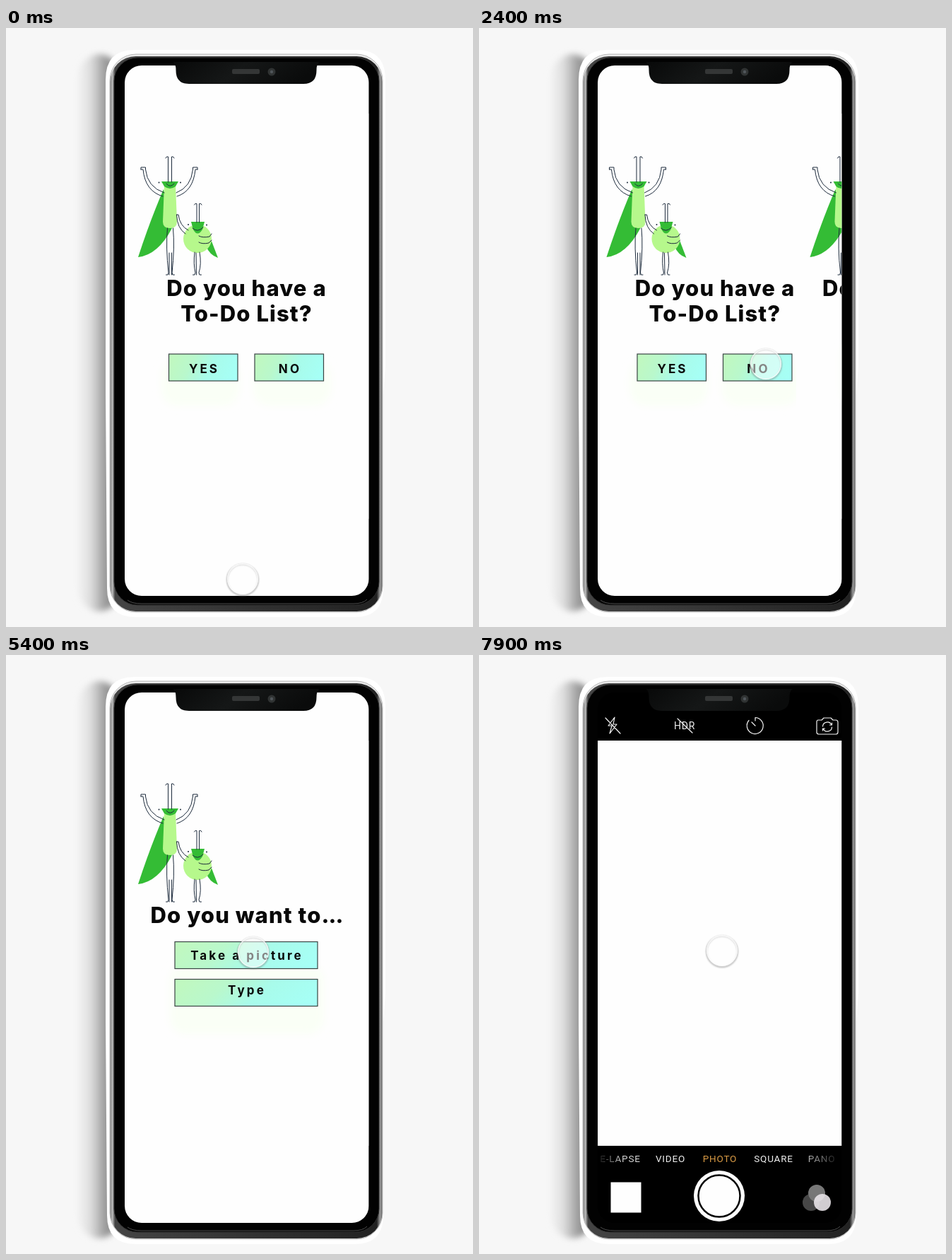
Animation of 661 by 847 pixels, one loop 8000 ms. Source, as an HTML page:

```html
<!DOCTYPE html>
<html lang="en">
<head>
<meta charset="utf-8">
<title>To-do app prototype</title>
<style>
  html, body { margin: 0; width: 100%; height: 100%; overflow: hidden; background: #f7f7f7; }
  svg { display: block; width: 100vw; height: 100vh; }
  text { font-family: Inter, "Open Sans", sans-serif; font-weight: 700; text-anchor: middle; fill: #080808; }
  .title { font-size: 31px; font-weight: 800; letter-spacing: 1.1px; }
  .dots { letter-spacing: -.9px; }
  .label { font-size: 17px; letter-spacing: 3.1px; }
  .mode { font: 400 13.5px Roboto, sans-serif; letter-spacing: .8px; fill: #eee; }
  .line { fill: none; stroke: #1d2b3c; stroke-width: 1; stroke-linecap: round; stroke-linejoin: round; }
  .icon { fill: none; stroke: #f4f4f4; stroke-width: 1.2; stroke-linecap: round; stroke-linejoin: round; }
  .button { fill: url(#mint); stroke: #3a4444; stroke-width: 1.2; }
  .glow { fill: #fafff6; filter: url(#soft); }
  .leaf { fill: #34bc35; }
  .lime { fill: #b6f88c; }
</style>
</head>
<body>
<svg viewBox="0 0 661 847">
  <defs>
    <linearGradient id="mint" x1="0" y1=".4" x2="1" y2=".6">
      <stop offset="0" stop-color="#c0f8c0"/>
      <stop offset=".3" stop-color="#b9f8cc"/>
      <stop offset=".6" stop-color="#a8fbea"/>
      <stop offset="1" stop-color="#a6fff6"/>
    </linearGradient>
    <linearGradient id="shade">
      <stop offset="0" stop-color="#f4f4f4"/>
      <stop offset=".3" stop-color="#dedede"/>
      <stop offset=".66" stop-color="#989898"/>
      <stop offset="1" stop-color="#808080"/>
    </linearGradient>
    <linearGradient id="metal">
      <stop offset="0" stop-color="#777"/>
      <stop offset=".008" stop-color="#bbb"/>
      <stop offset=".018" stop-color="#444"/>
      <stop offset=".98" stop-color="#222"/>
      <stop offset=".992" stop-color="#999"/>
      <stop offset="1" stop-color="#666"/>
    </linearGradient>
    <linearGradient id="notch" x1="0" y1="0" x2="1" y2=".2">
      <stop offset="0" stop-color="#080909"/>
      <stop offset=".5" stop-color="#151717"/>
      <stop offset="1" stop-color="#0a0b0b"/>
    </linearGradient>
    <linearGradient id="fadeIn" gradientUnits="userSpaceOnUse" x1="166" x2="206" y1="0" y2="0">
      <stop offset="0" stop-color="#000"/><stop offset="1" stop-color="#d8d8d8"/>
    </linearGradient>
    <linearGradient id="fadeOut" gradientUnits="userSpaceOnUse" x1="464" x2="504" y1="0" y2="0">
      <stop offset="0" stop-color="#bbb"/><stop offset="1" stop-color="#222"/>
    </linearGradient>
    <filter id="soft" x="-30%" y="-60%" width="160%" height="220%"><feGaussianBlur stdDeviation="6"/></filter>
    <filter id="haze" x="-40%" y="-5%" width="180%" height="110%"><feGaussianBlur stdDeviation="4"/></filter>
    <filter id="edge"><feGaussianBlur stdDeviation=".8"/></filter>
    <clipPath id="screen"><rect x="168" y="53" width="345.500" height="750" rx="24"/></clipPath>

    <g id="insects">
      <path class="leaf" d="M223 228Q204 272 187 324Q215 321 235 283Z"/>
      <path class="lime" d="M224 222H240L242 274Q242 283 232 283Q222 283 222 274Z"/>
      <path class="leaf" d="M220 217H244L240 224Q232 230 224 224Z"/>
      <path class="line" d="M226 184Q227 181 229.500 182V218M238 184Q237 181 234.500 182V218
        M227 220Q232 227 238 220
        M191 200V197H197.500V200Q200 225 224 233M191 200H194Q197 231 222 238
        M271 200V197H264.500V200Q262 225 241 233M271 200H268Q265 231 242 238
        M228.500 283Q226 310 230 346L229 349H226.500M231 318V349
        M236.500 283Q239 310 235 346L236 349H238.500M234.500 318V349"/>
      <path class="leaf" d="M287 291L300 325Q288 321 283 308Z"/>
      <circle class="lime" cx="271" cy="298" r="20"/>
      <path class="leaf" d="M262 274H281L278 285Q271 296 265 285Z"/>
      <path class="line" d="M266.500 250Q268 247 270 248.500V275M277 250Q276 247 273.500 248.500V275
        M264 283Q271 290 279 282
        M241.500 264H244Q246 280 258 286M241.500 264Q242 283 254 291
        M273 294Q278 297 288 295L291 291M273 303Q278 306 287 304L291 300
        M267 317Q265 334 268 346L267 349H264.500M269 318L269.500 349
        M274 317Q277 334 273 346L274 349H276.500"/>
      <g fill="#1d2b3c">
        <circle cx="216.500" cy="218.500" r="1"/><circle cx="247" cy="218.500" r="1"/>
        <circle cx="258" cy="278" r="1"/><circle cx="284" cy="278.500" r="1"/>
      </g>
    </g>
  </defs>

  <rect width="661" height="847" fill="#f7f7f7"/>
  <rect x="101" y="37" width="62" height="788" rx="36" fill="url(#shade)" filter="url(#haze)"/>
  <path fill="#fff" d="M181 31H497Q537 31 537 73V478L534 520V792Q534 833 494 833H183Q143 833 143 792L141 520V73Q141 31 181 31Z"/>
  <rect x="147" y="37" width="386" height="789" rx="37" fill="#e9e9e9" stroke="#aaa" stroke-width=".8"/>
  <rect x="147.500" y="40" width="385" height="785" rx="36" fill="url(#metal)"/>
  <rect x="153" y="42" width="375" height="774" rx="33" fill="#020202" stroke="#2c2c2c"/>
  <path d="M172 809Q178 814 192 814H492Q505 814 511 808" fill="none" stroke="#4d4d4d"/>

  <g clip-path="url(#screen)">
    <g id="askPage">
      <rect x="167" y="53" width="347" height="750" fill="#fefefe"/>
      <rect class="glow" x="220" y="470" width="110" height="64" rx="22"/>
      <rect class="glow" x="350" y="470" width="110" height="64" rx="22"/>
      <use href="#insects"/>
      <text class="title" x="340.500" y="379">Do you have a</text>
      <text class="title" x="340.500" y="415">To-Do List?</text>
      <rect class="button" x="230.500" y="461" width="97.500" height="38"/>
      <rect class="button" x="352" y="461" width="97.500" height="38"/>
      <text class="label" x="280.500" y="488">YES</text>
      <text class="label" x="402" y="488">NO</text>
    </g>
    <g id="choicePage">
      <rect x="167.500" y="53" width="400" height="750" fill="#fefefe"/>
      <rect class="glow" x="232" y="438" width="218" height="98" rx="22"/>
      <use href="#insects"/>
      <text class="title" x="340.500" y="379">Do you want to<tspan class="dots">...</tspan></text>
      <rect class="button" x="239" y="405.500" width="202" height="38"/>
      <rect class="button" x="239" y="458.500" width="202" height="38"/>
      <text class="label" x="341" y="431">Take a picture</text>
      <text class="label" x="341" y="480">Type</text>
    </g>
    <g id="cameraPage">
      <rect x="167.500" y="53" width="347" height="750" fill="#000"/>
      <rect x="167.500" y="121" width="346" height="573" fill="#fefefe"/>
      <path class="icon" d="M179 89L200 111M192 88L183 100H188L185 111L195 98H190Z"/>
      <text class="mode" x="291" y="105" style="font-size:14px">HDR</text>
      <path class="icon" d="M281 90L302 110M391 88.500V93M391 88.500A11.500 11.500 0 1 1 382 92.500M386 95L391 100"/>
      <path class="icon" d="M480 92H485L488 89H498L501 92H505Q508 92 508 95V109Q508 112 505 112H481Q478 112 478 109V95Q478 92 480 92M486.500 101A6.500 6.500 0 0 1 499 99M499.500 102A6.500 6.500 0 0 1 487 104M496.500 99H499.500V96M489.500 104H486.500V107"/>
      <text class="mode" x="200" y="717" style="fill:url(#fadeIn)">E-LAPSE</text>
      <text class="mode" x="271" y="717">VIDEO</text>
      <text class="mode" x="341" y="717" style="fill:#d99b45">PHOTO</text>
      <text class="mode" x="417" y="717">SQUARE</text>
      <text class="mode" x="485" y="717" style="fill:url(#fadeOut)">PANO</text>
      <rect x="186.500" y="745.500" width="43" height="43" fill="#fefefe"/>
      <circle cx="340" cy="765" r="36" fill="#fefefe"/>
      <circle cx="340" cy="765" r="29.500" fill="none" stroke="#000" stroke-width="2.500"/>
      <circle cx="478" cy="761" r="12" fill="#777"/>
      <circle cx="470" cy="774" r="12" fill="#777" opacity=".6"/>
      <circle cx="486" cy="774" r="12" fill="#e8e4e8" opacity=".9"/>
    </g>
  </g>

  <path d="M236 48Q240.500 50 240.500 60Q240.500 79 259 79H421Q439.500 79 439.500 60Q439.500 50 444 48Z" fill="url(#notch)"/>
  <rect x="320" y="58" width="39" height="7" rx="2" fill="#343636"/>
  <circle cx="376" cy="62" r="5.500" fill="#303333"/>
  <circle cx="376" cy="62" r="2.200" fill="#50565a"/>

  <g id="cursor">
    <circle cy="1.300" r="21.800" fill="none" stroke="#777" stroke-width="1.500" opacity=".75" filter="url(#edge)"/>
    <circle r="22" fill="#fff" fill-opacity=".5"/>
    <circle r="21.300" fill="none" stroke="#fff" stroke-width="1.400" opacity=".7"/>
  </g>
</svg>
<script>
  const LOOP = 8000, STEP = 100, SLIDE = 500, WIDTH = 346, PARALLAX = 35;
  const [ask, choice, camera, cursor] =
    ["askPage", "choicePage", "cameraPage", "cursor"].map(id => document.getElementById(id));

  // Cursor stops: time, x, y
  const stops = [
    [0, 335, 779], [200, 335, 779], [1300, 403, 474], [1700, 403, 474], [2300, 406, 475],
    [2600, 406, 475], [3300, 408, 517], [3800, 408, 517], [5200, 350, 420],
    [5700, 350, 420], [6700, 344, 418], [LOOP, 344, 418]
  ];

  const clamp = v => Math.min(1, Math.max(0, v));
  const smooth = v => v * v * (3 - 2 * v);
  const mix = (a, b, k) => a + (b - a) * k;
  const move = (el, x, y = 0) => el.setAttribute("transform", `translate(${x.toFixed(2)} ${y.toFixed(2)})`);
  const show = (el, on) => el.setAttribute("visibility", on ? "visible" : "hidden");
  const slide = (t, start) => smooth(clamp((t - start) / SLIDE));

  function cursorAt(t) {
    const next = stops.findIndex(stop => stop[0] > t);
    const [t0, x0, y0] = stops[next - 1], [t1, x1, y1] = stops[next];
    const k = smooth((t - t0) / (t1 - t0));
    return [mix(x0, x1, k), mix(y0, y1, k)];
  }

  function draw(t) {
    const first = slide(t, 2262), second = slide(t, 7063);
    move(ask, -PARALLAX * first);
    move(choice, WIDTH * (1 - first) - PARALLAX * second);
    move(camera, WIDTH * (1 - second));
    show(ask, first < 1);
    show(choice, second < 1);
    move(cursor, ...cursorAt(t));
  }

  function tick() {
    draw(Math.floor(performance.now() % LOOP / STEP) * STEP);
    requestAnimationFrame(tick);
  }
  tick();
</script>
</body>
</html>
```
